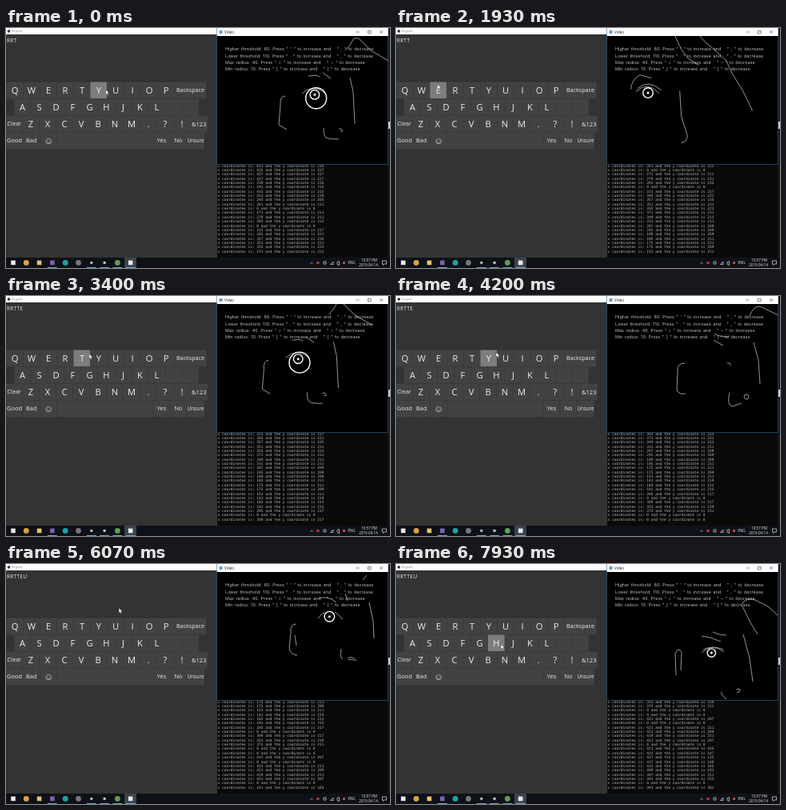
Animation, 480 px wide and 300 px high, one loop 8000 ms. Source, as an HTML page:

```html
<!DOCTYPE html>
<html lang="en">
<head>
<meta charset="utf-8">
<title>Eye-controlled keyboard</title>
<style>
  html, body { margin: 0; width: 100%; height: 100%; overflow: hidden; background: #000; }
  svg { display: block; width: 100vw; height: 100vh; }
  text { white-space: pre; fill: #ececec; font-family: "Open Sans", sans-serif; }
  .key rect { fill: #424242; stroke: #393939; stroke-width: .5; }
  .key.hover rect { fill: #7d7d7d; stroke: none; }
  .key.flash rect { fill: #a8d6c9; stroke: none; }
  .key.flash text { visibility: hidden; }
  #typed { font-size: 6.3px; letter-spacing: .4px; }
  .console text { font: 4.5px "DejaVu Sans Mono", monospace; fill: #b8b8b8; }
  .help text { font: 5.4px Inter, sans-serif; letter-spacing: .08px; word-spacing: .8px; fill: #c0c0c0; }
  .edges { fill: none; stroke: #c6c6c6; stroke-width: .75; }
  .eye circle { fill: none; stroke: #fff; stroke-width: 1.4; }
  .eye .dot { fill: #fff; stroke: none; }
  .tray text { font: 4.5px "Open Sans", sans-serif; text-anchor: middle; }
</style>
</head>
<body>
<svg id="stage" viewBox="0 0 480 300" preserveAspectRatio="none">
  <defs><clipPath id="videoArea"><rect x="264" y="10" width="213.5" height="160"/></clipPath></defs>
  <rect width="264" height="288" fill="#333"/>
  <rect width="264" height="8" fill="#fff"/>
  <circle cx="3.5" cy="4" r="1.8" fill="#333"/>
  <text x="7" y="5.4" font-size="3.8" style="fill:#888">Keypad</text>
  <text id="typed" x="1" y="18.4"></text>
  <g id="keys"></g>

  <rect x="264" y="0" width="216" height="288" fill="#0a0a0a"/>
  <rect x="477.5" y="0" width="2.5" height="288" fill="#1b1b1b"/>
  <rect x="477.5" y="117" width="2.5" height="9" fill="#cdcdcd"/>
  <g class="console" id="console"></g>

  <rect x="263.7" y="0" width="214" height="170.6" fill="#000" stroke="#2b6a94" stroke-width=".6"/>
  <rect x="263.7" width="214" height="10" fill="#fff"/>
  <rect x="266.5" y="3" width="4" height="4" fill="#6a9ac0"/>
  <text x="273" y="6.8" font-size="4.6" style="fill:#222">Video</text>
  <path d="M437.5 5h4M452.5 3.3h3.6v3.6h-3.6zM467.5 3.3l3.6 3.6m0-3.6l-3.6 3.6" fill="none" stroke="#333" stroke-width=".6"/>
  <g clip-path="url(#videoArea)">
    <g class="help" id="help"></g>
    <g id="face"><path class="edges" id="edges"/></g>
    <g class="eye" id="eye"></g>
  </g>

  <g class="tray" id="taskbar">
    <rect y="287" width="480" height="13" fill="#0f1118"/>
    <rect x="148" y="287" width="15" height="13" fill="#3d434b"/>
    <text x="432" y="295.2">ENG</text>
    <text x="454" y="292.4">10:57 PM</text>
    <text x="453" y="298.3">2019-04-14</text>
    <path d="M380.5 294.5l1.6-1.6 1.6 1.6M470.5 291h5v4h-3l-1 1.4v-1.4h-1zM397 292h3v3h-3zM405.5 295.5l3.5-3.5v3.5zM414 292.5v3l2.5 1v-5z" fill="none" stroke="#ddd" stroke-width=".7"/>
    <circle cx="390" cy="293.5" r="1.8" fill="#c93636"/>
    <rect x="421" y="292" width="3" height="3" fill="#c44"/>
  </g>
  <path id="cursor" d="M0 0V6.2L1.5 4.9 2.6 7.2 3.6 6.7 2.6 4.5H4.5Z" fill="#fff" stroke="#111" stroke-width=".35"/>
</svg>
<script>
const LOOP = 8000, VISIBLE = 21;
const $ = id => document.getElementById(id);

function add(parent, tag, attrs, label) {
  const node = document.createElementNS("http://www.w3.org/2000/svg", tag);
  for (const name in attrs) node.setAttribute(name, attrs[name]);
  if (label !== undefined) node.textContent = label;
  return parent.appendChild(node);
}

// Tracker readings in camera pixels; "0 0" means that no eye was found.
const readings = `411 219,425 227,427 227,427 227,239 215,241 213,415 215,413 219,245 205,261 211,0 0,
271 211,279 211,283 215,0 0,331 217,345 221,357 235,351 231,355 223,371 231,
349 213,331 211,287 209,245 209,189 209,185 211,175 211,175 209,153 211,141 219,165 213,181 215,
205 217,0 0,309 217,353 219,373 211,0 0,0 0,421 207,0 0,421 211,421 209,419 211,421 207,0 0,421 165,
423 147,417 135,417 149,415 165,409 191,397 211,391 253,0 0,391 301`
  .split(",").map(pair => pair.trim().split(" ").map(Number));

const times = [0, 70, 330, 530, 800, 1000, 1270, 1470, 1670, 1930, 2200, 2400, 2670,
  2870, 3130, 3330, 3530, 3800, 4000, 4200, 4400, 4670, 4870, 5130, 5330, 5600, 5800, 6000,
  6200, 6470, 6670, 6870, 7130, 7330, 7530, 7670, 7930];
const poseAt = "0001112222222220333355555554444555666".split("").map(Number);
const typing = [[0, "RRT"], [800, "RRTT"], [2870, "RRTTE"], [4870, "RRTTEU"]];
const flash = { label: "R", from: 1000, to: 1130 };

// Face outlines, each with the reading it belongs to and its circles (dx, dy, radius).
const plainEye = [[0, .7, 6.3]];
const poses = [
  { at: [371, 231], eye: [[0, .8, 13], [-1.8, -3.7, 5.8]],
    d: "M424 28Q431 21 433 16T441 13L456 28 478 41M378 60l10-1 4 2M396 56l10 7M430 62L434 80 436 120M349 85Q342 85 343 97L341 121 351 127M397 125Q397 137 402 138T416 139M416 127q2-3 4 0t-2 2M370 82Q384 69 398 81" },
  { at: [189, 209], eye: [[0, 1.6, 10.3], [5, 0, 5]],
    d: "M302 106Q304 76 315 58L327 57 341 62M317 38L326 24 341 19M366 10L384 33 391 39M394 10L407 33 413 43M409 22L421 35 440 62 446 73M373 81Q373 107 376 119L381 131 378 138 373 140M378 133l5 3M312 80Q327 63 343 82M316 73Q328 65 341 77" },
  { at: [181, 215], eye: plainEye,
    d: "M358 11L366 28 374 39 388 48M388 10L396 19 408 29 422 42 430 59 443 80 455 105M364 80L366 112 374 137 371 143 366 145M303 78Q303 67 314 60L329 64M309 81Q324 67 338 83M311 77Q325 65 341 79" },
  { at: [373, 211], eye: plainEye,
    d: "M361 84Q351 84 352 94L351 118Q355 124 362 122M414 84q5-1 4 3M417 121Q413 136 420 138L432 134M435 126a3 3 0 1 1 3 3q-2 0-3-3M447 58L453 80 455 110M397 55l12 7M398 47Q408 53 417 50M442 25Q447 12 455 13L478 24" },
  { at: [421, 165], eye: plainEye,
    d: "M363 75Q355 75 356 85L354 106Q357 114 364 114M361 89l2 13M419 106Q417 117 421 119M427 118Q433 114 438 121M428 120q5-2 8 1M454 48L459 72 460 93M391 43Q402 39 413 48M390 68Q394 62 399 60M411 60Q416 63 421 69M446 20l5-6M424 37l3 9" },
  { at: [409, 191], eye: plainEye,
    d: "M352 118Q350 85 354 81T360 88L357 100 361 116Q357 123 352 118M389 76Q393 70 399 67M405 68Q410 71 414 77M449 59L454 82 455 108M441 12L448 23M473 12l5 6M422 130q4-2 8 1M390 47Q400 53 408 55" },
  { at: [391, 301], eye: [[0, .7, 5.2]],
    d: "M382 111Q395 98 410 110M384 107Q396 101 409 107M382 90l11 2 13 5M396 85l8 3 9 1M350 139L349 112Q353 103 357 110L356 133M434 88L442 118 446 147M432 50Q439 41 449 45L465 53 478 65M433 53L443 73 452 88M406 160q2 6 7 9M426 158a2 2 0 1 1 2 2l-2 1" }
];

const keys = [];
function addKey(x, row, width, label, size = 11.2) {
  const y = 67.5 + row * 21;
  const node = add($("keys"), "g", { class: "key" });
  add(node, "rect", { x, y, width, height: 20.7 });
  add(node, "text", { x: x + width / 2, y: y + 10.3 + size * .36, "font-size": size, "text-anchor": "middle" }, label);
  keys.push({ node, label, x, y, width });
}
[..."QWERTYUIOP"].forEach((c, i) => addKey(.5 + 21 * i, 0, 21, c));
addKey(210.5, 0, 40, "Backspace", 7.2);
[..."ASDFGHJKL", "", ""].forEach((c, i) => addKey(10 + 21 * i, 1, 21, c));
addKey(0, 2, 20.5, "Clear", 7.2);
[..."ZXCVBNM.?!"].forEach((c, i) => addKey(20.5 + 21 * i, 2, 21, c));
addKey(230.5, 2, 21.5, "&123", 7.5);
[[0, 21, "Good", 7.4], [21, 21.5, "Bad", 7.4], [42.5, 21, "☺", 11.5], [63.5, 120.5, "", 8],
 [184, 21, "Yes", 7.4], [205, 21, "No", 7.4], [226, 22, "Unsure", 6.2]]
  .forEach(([x, width, label, size]) => addKey(x, 3, width, label, size));

[`Higher threshold: 80. Press " ' " to increase and   " ; " to decrease`,
 `Lower threshold: 110. Press " . " to increase and   " , " to decrease`,
 `Max radius: 40. Press " = " to increase and   " − " to decrease`,
 `Min radius: 10. Press " ] " to increase and   " [ " to decrease`]
  .forEach((line, i) => add($("help"), "text", { x: 274, y: 28.1 + 8.45 * i }, line));

const rows = Array.from({ length: VISIBLE }, (_, i) =>
  add($("console"), "text", { x: 264.6, y: 173.6 + 5.35 * i }));

["#e8e8e8", "#d9a441", "#e3c56b", "#8060b8", "#1aa5a5", "#777", "#bbb", "#ccc", "#5fa04e", "#e4eaee"]
  .forEach((fill, i) => {
    const x = 9 + 16.3 * i;
    const half = i === 6 || i === 7 ? 1.5 : 2.8;
    if ([1, 4, 5, 8].includes(i)) add($("taskbar"), "circle", { cx: x, cy: 293.4, r: 3.4, fill });
    else add($("taskbar"), "rect", { x: x - half, y: 293.4 - half, width: half * 2, height: half * 2, fill });
    if (i === 3 || i > 5) add($("taskbar"), "rect", { x: x - 6, y: 299, width: 12, height: 1, fill: "#6fa8d0" });
  });

function showStep(step) {
  const last = step + VISIBLE - 1;
  rows.forEach((row, i) => {
    const [x, y] = readings[step + i];
    row.textContent = `x coordinates is: ${x} and the y coordinate is ${y}`;
  });

  let seen = last;
  while (!readings[seen][0]) seen--;
  const [ex, ey] = readings[seen];
  const pose = poses[poseAt[step]];
  $("edges").setAttribute("d", pose.d);
  $("face").setAttribute("transform", `translate(${(ex - pose.at[0]) / 3} ${(ey - pose.at[1]) / 3})`);

  $("eye").replaceChildren();
  if (seen === last) {
    const cx = 264 + ex / 3, cy = 10 + ey / 3;
    for (const [dx, dy, r] of pose.eye) add($("eye"), "circle", { cx: cx + dx, cy: cy + dy, r });
    const [dx, dy] = pose.eye[pose.eye.length - 1];
    add($("eye"), "circle", { class: "dot", cx: cx + dx, cy: cy + dy, r: 1.5 });
  }

  const px = ex / 3 + .8, py = ey / 3;
  $("cursor").setAttribute("transform", `translate(${px} ${py})`);
  for (const k of keys) {
    const inside = px >= k.x && px < k.x + k.width && py >= k.y - .6 && py < k.y + 20.7;
    k.node.classList.toggle("hover", inside);
  }
}

const flashKey = keys.find(k => k.label === flash.label).node;
let shown = -1;
function draw(now) {
  const t = (now + 5) % LOOP;
  const step = times.findLastIndex(start => start <= t);
  if (step !== shown) showStep(shown = step);
  $("typed").textContent = typing.findLast(([start]) => start <= t)[1];
  flashKey.classList.toggle("flash", t >= flash.from && t < flash.to);
}

const started = performance.now();
function tick() {
  draw(performance.now() - started);
  requestAnimationFrame(tick);
}
tick();
</script>
</body>
</html>
```
